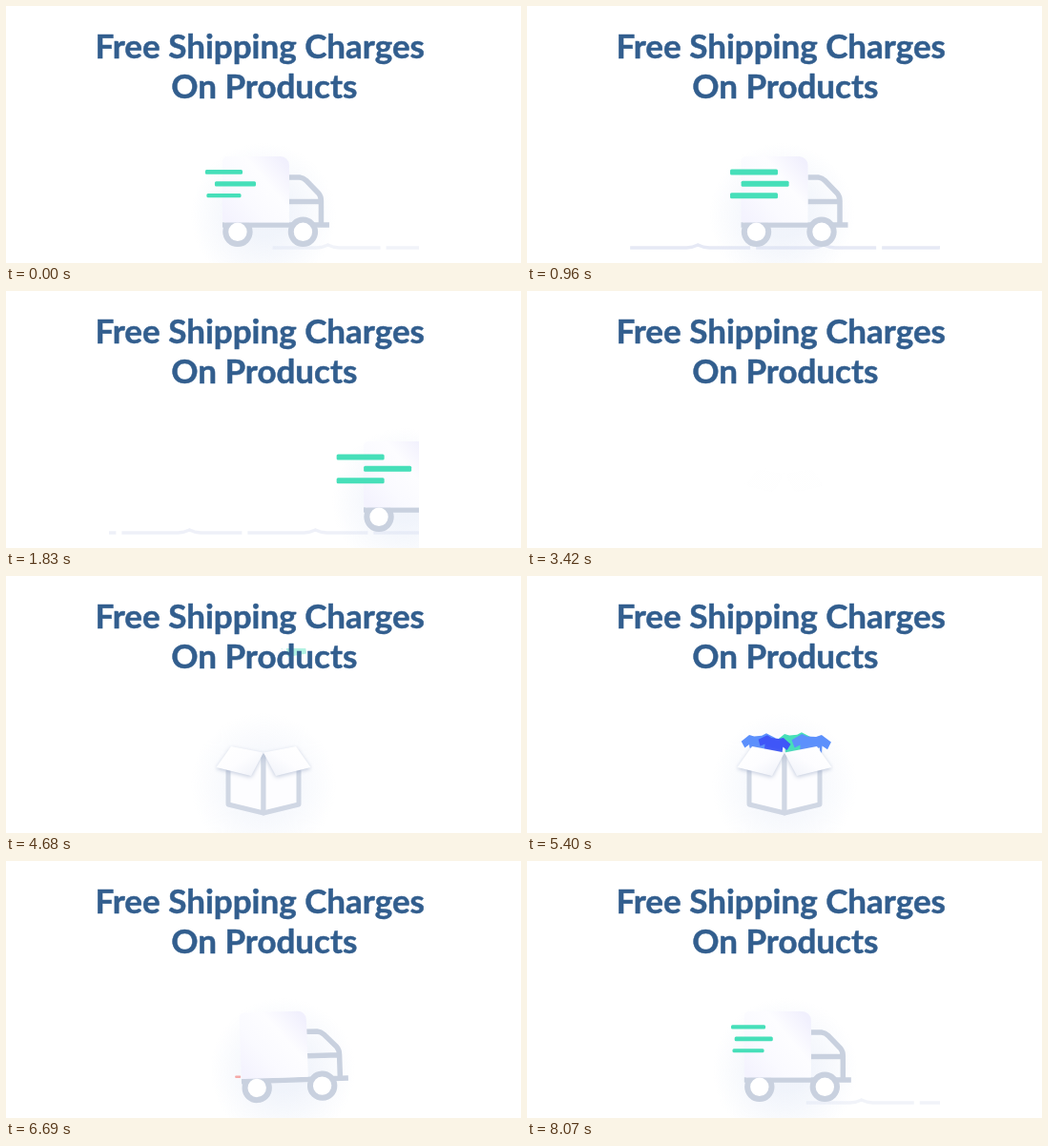
Animation, 540 px wide and 270 px high, one loop 8.1 s. Source, as an HTML page with a canvas:

```html
<!DOCTYPE html>
<html lang="en">
<head>
<meta charset="utf-8">
<title>Free Shipping</title>
<style>
  html, body { margin: 0; width: 100%; height: 100%; overflow: hidden; background: #fff; }
  canvas { position: absolute; left: 0; top: 0; }
  h1 {
    position: absolute; left: 0; top: 20px; width: 540px; margin: 0;
    font: 700 35px/42px Lato, sans-serif; color: #325e8e; text-align: center; white-space: nowrap;
    -webkit-text-stroke: 0.5px #325e8e;
  }
  h1 span { display: block; position: relative; }
  .first { left: -3.8px; }
  .second { left: 0.8px; }
</style>
</head>
<body>
<canvas id="stage" width="540" height="270"></canvas>
<h1><span class="first">Free Shipping Charges</span><span class="second">On Products</span></h1>
<script>
const ctx = document.getElementById('stage').getContext('2d');
const LOOP = 8100, TAU = 2 * Math.PI;
const STEEL = '#c9d1df', TEAL = '#46dfb9', SKY = '#5c90fc', DEEP = '#3f56f8';

const clamp = v => Math.min(1, Math.max(0, v));
const part = (t, a, b) => clamp((t - a) / (b - a));
const smooth = (t, a, b) => { const u = part(t, a, b); return u * u * (3 - 2 * u); };
const mix = (a, b, u) => a + (b - a) * u;
const wave = (t, period, phase) => Math.cos(TAU * t / period + phase);
const mirror = points => points.map(([x, y]) => [-x, y]);

function trace(points) {
  ctx.beginPath();
  points.forEach(([x, y]) => ctx.lineTo(x, y));
}

function fillPoly(points, color) {
  trace(points);
  ctx.fillStyle = color;
  ctx.fill();
}

function roundRect(x, y, w, h, r, color) {
  ctx.beginPath();
  ctx.roundRect(x, y, w, h, r);
  ctx.fillStyle = color;
  ctx.fill();
}

function gradient(x0, y0, x1, y1, colors) {
  const g = ctx.createLinearGradient(x0, y0, x1, y1);
  colors.forEach((c, i) => g.addColorStop(i / (colors.length - 1), c));
  return g;
}

function halo(x, y, r, strength) {
  const g = ctx.createRadialGradient(x, y, r * 0.3, x, y, r);
  g.addColorStop(0, `rgba(214,224,244,${strength})`);
  g.addColorStop(1, 'rgba(214,224,244,0)');
  ctx.fillStyle = g;
  ctx.fillRect(x - r, y - r, 2 * r, 2 * r);
}

// Road: dashes with a small bump, scrolling left; t = 0 at the loop start
function drawRoad(t) {
  const span = 132, scroll = 0.44 * t;
  const start = Math.max(108, 280 - scroll);
  if (start >= 433) return;
  ctx.save();
  ctx.beginPath();
  ctx.rect(start, 240, 433 - start, 30);
  ctx.clip();
  ctx.globalAlpha = mix(0.55, 1, part(t, 0, 500)) * (1 - part(t, 1600, 2310));
  ctx.strokeStyle = '#e6e9f5';
  ctx.lineWidth = 3.5;
  ctx.translate((338 - scroll) % span - span, 0);
  for (let i = 0; i < 6; i++) {
    ctx.beginPath();
    ctx.moveTo(-71, 254);
    ctx.lineTo(-12, 254);
    ctx.quadraticCurveTo(-5, 253.5, 0, 251);
    ctx.quadraticCurveTo(5, 253.5, 12, 254);
    ctx.lineTo(55, 254);
    ctx.stroke();
    ctx.translate(span, 0);
  }
  ctx.restore();
}

// Reverse in, settle, nudge forward, then race off
function truckX(t) {
  const arrive = 210 * (1 - part(t, -2050, -1080)) ** 2 - 4 + 4 * smooth(t, -1080, -930);
  const nudge = 7 * smooth(t, -570, -300) - 9.5 * smooth(t, -300, 150);
  const rush = 149.5 * Math.max(0, (t - 1390) / 440) ** 3;
  return arrive + nudge + rush;
}

function drawWheel(x) {
  ctx.beginPath();
  ctx.arc(x, 237.3, 12.7, 0, TAU);
  ctx.fillStyle = '#fff';
  ctx.fill();
  ctx.lineWidth = 6;
  ctx.stroke();
}

function drawSpeedLines(t) {
  const sway = 232 + 8.5 * wave(t - 960, 570, 0);
  const counter = 244 + 10 * wave(t - 960, 435, -0.64);
  [sway, counter, sway].forEach((x, i) => {
    const delay = [0, -40, 30][i];
    const grow = part(t, delay - 390, delay + 110);
    const w = 50 * grow, h = 6 * grow;
    if (grow) roundRect(x - w / 2, 174.4 + 12.4 * i - h / 2, w, h, 1.5, TEAL);
  });
}

function drawCab() {
  ctx.lineWidth = 5.5;
  ctx.beginPath();
  ctx.moveTo(297, 180);
  ctx.lineTo(308, 180);
  ctx.quadraticCurveTo(312, 180.5, 315, 183.5);
  ctx.lineTo(328, 197);
  ctx.quadraticCurveTo(330.5, 200, 330.5, 205);
  ctx.lineTo(330.5, 230);
  ctx.moveTo(297, 205.5);
  ctx.lineTo(330, 205.5);
  ctx.moveTo(227, 230);
  ctx.lineTo(339, 230);
  ctx.stroke();
}

function drawTruck(t) {
  ctx.save();
  ctx.translate(truckX(t), 0);
  halo(270, 220, 76, 0.35);
  if (t < -870) roundRect(220, 225.5, 6, 2.5, 1, '#f5aaa8');

  ctx.save();
  const tilt = -1.9 * (smooth(t, -2050, -1500) - smooth(t, -1250, -930));
  ctx.translate(277, 237);
  ctx.rotate(tilt * Math.PI / 180);
  ctx.translate(-277, -237);
  ctx.strokeStyle = STEEL;
  ctx.lineJoin = 'round';
  drawCab();
  drawWheel(243);
  drawWheel(311.5);
  const paint = gradient(232, 224, 297, 170, ['#f4f3fe', '#fafaff', '#fdfdff', '#f1f0fd']);
  roundRect(227, 158, 70, 69.5, [5, 9, 0, 3], paint);
  ctx.restore();

  drawSpeedLines(t);
  ctx.restore();
}

const sleeve = [[4, -8], [9, -10], [18, -4], [15, 3], [10, 0], [10, 12]];
const shirt = [...sleeve, ...mirror(sleeve).reverse()];
// Resting place, tilt and size of each garment, in order of arrival
const clothes = [
  { color: TEAL, x: 280, y: 175, tilt: -0.1, size: 1 },
  { color: SKY, x: 243, y: 176, tilt: -0.1, size: 1 },
  { color: SKY, x: 298, y: 178, tilt: 0.05, size: 1.15 },
  { color: DEEP, x: 259, y: 178, tilt: 0.15, size: 0.95 }
];

function drawClothes(t) {
  const sink = 22 * smooth(t, 5520, 5760);
  clothes.forEach(({ color, x, y, tilt, size }, i) => {
    const start = 4640 + 50 * i;
    const left = 1 - part(t, start, start + 600);
    ctx.save();
    ctx.globalAlpha = part(t, start, start + 100);
    ctx.translate(x + 2.5 * (x - 270) * left, y + sink - 105 * (1 - smooth(t, start, start + 600)));
    ctx.rotate(tilt * (1 - left) + Math.sin(TAU * left) * 0.4);
    ctx.scale(size, size);
    fillPoly(shirt, color);
    ctx.restore();
  });
}

// Box coordinates are relative to its middle; the right half mirrors the left
function drawBox(t) {
  const show = smooth(t, 3400, 3870);
  const shut = smooth(t, 5510, 5800);
  const alpha = show * (1 - smooth(t, 5830, 6120));
  const size = mix(0.85, 1, show);
  ctx.save();
  ctx.globalAlpha = alpha;
  halo(270, 220, 76, 0.28);
  if (t > 4600 && t < 5800) drawClothes(t);
  ctx.globalAlpha = alpha;
  ctx.translate(270, 217.5);
  ctx.scale(size, size);

  ctx.strokeStyle = '#d0d7e4';
  ctx.lineWidth = 5;
  ctx.lineJoin = 'round';
  const side = [[0, -31], [-37, -37], [-37, 22.5], [0, 31.5]];
  for (const half of [side, mirror(side)]) {
    fillPoly(half, '#fdfdff');
    trace([[half[1][0], -27], half[2], half[3], half[0]]);
    ctx.stroke();
  }

  ctx.shadowColor = 'rgba(150,165,195,0.55)';
  ctx.shadowBlur = 4;
  ctx.shadowOffsetY = 1.5;
  const flap = [
    [-34, -38.5], [0, -32],
    [mix(-13, 14, shut), mix(-7.5, -41, shut)],
    [mix(-49.5, -15, shut), mix(-16.5, -46, shut)]
  ];
  for (const half of [flap, mirror(flap)]) {
    fillPoly(half, gradient(half[0][0], -39, half[2][0], -7, ['#ffffff', '#fdfdff', '#f2f4fa']));
  }
  ctx.restore();
}

function draw(t) {
  ctx.clearRect(0, 0, 540, 270);
  ctx.save();
  ctx.beginPath();
  ctx.rect(108, 76, 325, 194);
  ctx.clip();
  if (t > 3400 && t < 6120) drawBox(t);
  const ride = t < 3000 ? t : t - LOOP;
  if (ride > -2050 && ride < 2310) {
    drawRoad(ride);
    drawTruck(ride);
  }
  ctx.restore();
}

const begin = performance.now();
function tick() {
  draw((performance.now() - begin) % LOOP);
  requestAnimationFrame(tick);
}
tick();
</script>
</body>
</html>
```
